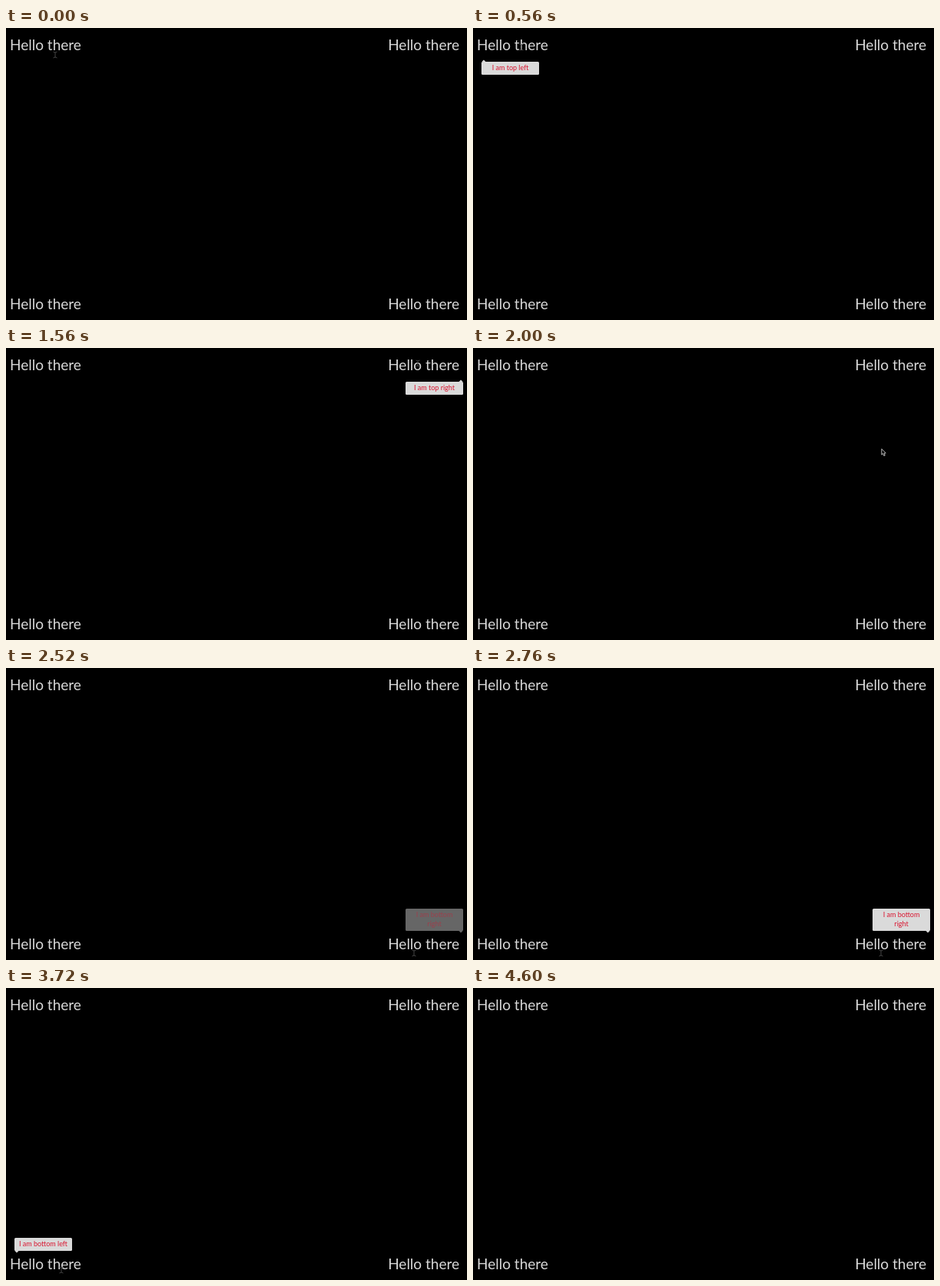
An HTML page with a canvas for the animation above (5520 ms loop, 600 by 381 pixels).

```html
<!DOCTYPE html>
<html lang="en">
<head>
<meta charset="utf-8">
<title>Corner tooltips</title>
<style>
  html, body { margin: 0; width: 100%; height: 100%; overflow: hidden; background: #000; }
  canvas { display: block; width: 600px; height: 381px; }
</style>
</head>
<body>
<canvas id="stage"></canvas>
<script>
const W = 600, H = 381, LOOP = 5520, STEP = 40, FADE = 300;
const TIP_W = 75, LINE = 12, TIP_PAD = 5;
const canvas = document.getElementById('stage');
const ctx = canvas.getContext('2d');
const ratio = window.devicePixelRatio || 1;
canvas.width = W * ratio;
canvas.height = H * ratio;
ctx.scale(ratio, ratio);

const tips = [
  { lines: ['I am top left'], show: 20, hide: 640 },
  { right: true, lines: ['I am top right'], show: 1150, hide: 1690 },
  { right: true, bottom: true, lines: ['I am bottom', 'right'], show: 2380, hide: 2870 },
  { bottom: true, lines: ['I am bottom left'], show: 3340, hide: 3970 }
];

// Each move eases the pointer to a new rest point; bow sags the path downwards.
const origin = { x: 64, y: 35 };
const moves = [
  { from: 0, to: 560, x: 63, y: 25, bow: 0 },
  { from: 560, to: 1215, x: 536, y: 20, bow: 5 },
  { from: 1700, to: 2480, x: 531, y: 372, bow: 0 },
  { from: 2860, to: 3434, x: 72, y: 368, bow: 5 },
  { from: 3940, to: 4440, x: 318, y: 207, bow: 0 },
  { from: 4440, to: 4600, x: 378, y: 40, bow: 0 }
];

const clamp = v => Math.max(0, Math.min(1, v));
const progress = (t, from, span) => clamp((t - from) / span);
const ease = k => k * k * (3 - 2 * k);

function pointerAt(t) {
  let { x, y } = origin;
  for (const m of moves) {
    const k = progress(t, m.from, m.to - m.from);
    x += (m.x - x) * ease(k);
    y += (m.y - y) * ease(k) + m.bow * Math.sin(Math.PI * k);
    if (k < 1) break;
  }
  return { x, y };
}

function drawHeadings() {
  ctx.font = '19px Lato, sans-serif';
  ctx.fillStyle = '#d8d8d8';
  for (const y of [29, 367]) {
    ctx.textAlign = 'left';
    ctx.fillText('Hello there', 5, y);
    ctx.textAlign = 'right';
    ctx.fillText('Hello there', 590, y);
  }
}

function drawTip({ right, bottom, lines, show, hide }, t) {
  const alpha = progress(t, show, FADE) * (1 - progress(t, hide, FADE));
  if (!alpha) return;
  const height = lines.length * LINE + TIP_PAD;
  const x = right ? 520 : 11;
  const y = bottom ? 343 - height : 44;
  const arrowX = right ? x + TIP_W - 3 : x + 3;
  const edge = bottom ? y + height : y;
  ctx.globalAlpha = alpha;
  ctx.fillStyle = '#dadada';
  ctx.beginPath();
  ctx.roundRect(x, y, TIP_W, height, 1.5);
  ctx.fill();
  ctx.beginPath();
  ctx.moveTo(arrowX - 2.5, edge);
  ctx.lineTo(arrowX, edge + (bottom ? 2.5 : -2.5));
  ctx.lineTo(arrowX + 2.5, edge);
  ctx.fill();
  ctx.font = '9px Lato, sans-serif';
  ctx.textAlign = 'center';
  ctx.fillStyle = '#d9142f';
  lines.forEach((line, i) => ctx.fillText(line, x + TIP_W / 2, y + 11.3 + i * LINE));
  ctx.globalAlpha = 1;
}

function drawBeam(x, y) {
  ctx.strokeStyle = '#444';
  ctx.lineWidth = 1;
  ctx.beginPath();
  for (const s of [-1, 1]) {
    ctx.moveTo(x - 2.5, y + 4 * s);
    ctx.lineTo(x, y + 3 * s);
    ctx.lineTo(x + 2.5, y + 4 * s);
  }
  ctx.moveTo(x, y - 3);
  ctx.lineTo(x, y + 3);
  ctx.stroke();
}

function drawArrow(x, y) {
  ctx.save();
  ctx.translate(x - 2.5, y - 4.5);
  ctx.beginPath();
  ctx.moveTo(0, 0);
  ctx.lineTo(0, 7.6);
  ctx.lineTo(1.7, 6);
  ctx.lineTo(3, 9);
  ctx.lineTo(4.4, 8.4);
  ctx.lineTo(3.2, 5.6);
  ctx.lineTo(5.4, 5.4);
  ctx.closePath();
  ctx.fillStyle = '#000';
  ctx.fill();
  ctx.strokeStyle = '#d0d0d0';
  ctx.lineWidth = 0.9;
  ctx.stroke();
  ctx.restore();
}

function drawPointer(t) {
  if (t >= moves.at(-1).to) return;
  const { x, y } = pointerAt(t);
  const overText = (x < 98 || x > 497) && (y < 37 || y > 346);
  (overText ? drawBeam : drawArrow)(x, y);
}

function frame(now) {
  const t = Math.floor((now % LOOP) / STEP) * STEP;
  ctx.fillStyle = '#000';
  ctx.fillRect(0, 0, W, H);
  drawHeadings();
  tips.forEach(tip => drawTip(tip, t));
  drawPointer(t);
}

let start;
function tick(now) {
  start ??= now;
  frame(now - start);
  requestAnimationFrame(tick);
}
frame(0);
requestAnimationFrame(tick);
</script>
</body>
</html>
```
